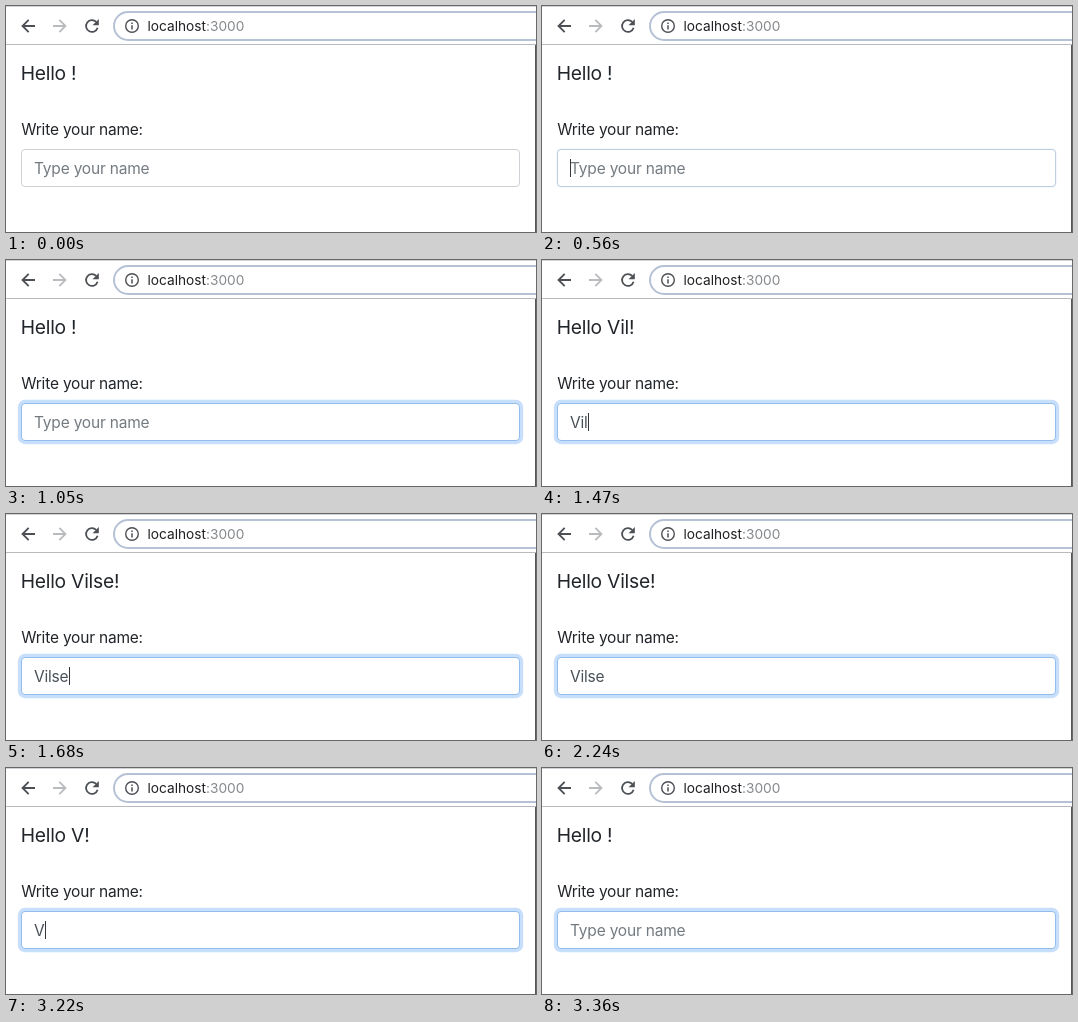
An HTML page for the animation above (3640 ms loop, 530 by 226 pixels).

```html
<!DOCTYPE html>
<html lang="en">
<head>
<meta charset="utf-8">
<title>Hello form</title>
<style>
  html, body { margin: 0; width: 100%; height: 100%; overflow: hidden; background: #fff; }
  svg { display: block; width: 530px; height: 226px; }
  text { font: 15.5px Inter, "Open Sans", sans-serif; letter-spacing: -0.013em; white-space: pre; fill: #212529; }
  #hello { font-size: 19.3px; }
  .url { font-size: 13.7px; letter-spacing: 0; fill: #202124; }
  .port { fill: #85898d; }
  .icon { fill: none; stroke: #4c4f53; stroke-width: 1.8; }
  .off { stroke: #b9bbbe; }
</style>
</head>
<body>
<svg viewBox="0 0 530 226">
  <defs>
    <path id="arrow" d="M7 0H-5.5M.7 -6.2L-5.5 0L.7 6.2"/>
  </defs>

  <rect width="530" height="1" fill="#cfd2d6"/>
  <rect y="38" width="530" height="1" fill="#b9babc"/>
  <rect x="529" y="39" width="1" height="187" fill="#55585b"/>

  <use href="#arrow" class="icon" x="22" y="20"/>
  <use href="#arrow" class="icon off" transform="translate(54 20) scale(-1 1)"/>
  <path class="icon" d="M91.6 21.8A5.9 5.9 0 1 1 90.2 15.9"/>
  <path d="M92.8 13V19.2H86.6Z" fill="#4c4f53"/>

  <rect x="108" y="6" width="460" height="28" rx="14" fill="#fff" stroke="#b5c2d5" stroke-width="2"/>
  <circle class="icon" cx="126" cy="20" r="6.3" style="stroke-width:1.4"/>
  <path class="icon" d="M126 16.4V18M126 19.2V23.6" style="stroke-width:1.5"/>
  <text class="url" x="141.5" y="25">localhost<tspan class="port">:3000</tspan></text>

  <text id="hello" x="14.7" y="74"></text>
  <text x="15.3" y="129">Write your name:</text>

  <rect id="glow" fill="#c8dffb"/>
  <rect id="box" x="15.5" y="143.5" width="498" height="37" rx="3.5" fill="#fff"/>
  <text id="field" x="28" y="168"></text>
  <rect id="caret" y="153" width="1" height="18" fill="#33373b"/>
</svg>

<script>
const LOOP = 3640;

// start ms, typed name, caret shown, focus amount
const steps = [
  [0, "", 0, 0],
  [560, "", 1, 0.25],
  [630, "", 1, 0.75],
  [700, "", 1, 1],
  [1050, "", 0, 1],
  [1120, "V", 1, 1],
  [1330, "Vi", 1, 1],
  [1470, "Vil", 1, 1],
  [1610, "Vils", 1, 1],
  [1680, "Vilse", 1, 1],
  [2240, "Vilse", 0, 1],
  [2730, "Vilse", 1, 1],
  [2800, "Vils", 1, 1],
  [2940, "Vil", 1, 1],
  [3080, "Vi", 1, 1],
  [3220, "V", 1, 1],
  [3290, "", 1, 1],
  [3360, "", 0, 1]
];

const [hello, field, caret, glow, box] =
  ["hello", "field", "caret", "glow", "box"].map(id => document.getElementById(id));

function set(el, attrs) {
  for (const key in attrs) el.setAttribute(key, attrs[key]);
}

function mix(a, b, p) {
  return `rgb(${a.map((v, i) => Math.round(v + (b[i] - v) * p))})`;
}

function draw([, name, blink, focus]) {
  hello.textContent = `Hello ${name}!`;
  field.textContent = name || "Type your name";
  field.style.fill = name ? "#495057" : "#737a80";

  const end = name ? field.getComputedTextLength() + 0.3 : 0;
  set(caret, { x: Math.round(28 + end), opacity: blink });

  const spread = 3.2 * focus;
  set(glow, {
    x: 15 - spread, y: 143 - spread,
    width: 499 + 2 * spread, height: 38 + 2 * spread,
    rx: 4 + spread, opacity: focus
  });
  set(box, { stroke: mix([206, 210, 214], [146, 189, 238], focus) });
}

let shown;
function tick() {
  const t = performance.now() % LOOP;
  const step = steps.findLast(s => s[0] <= t);
  if (step !== shown) draw(shown = step);
  requestAnimationFrame(tick);
}
tick();
</script>
</body>
</html>
```
